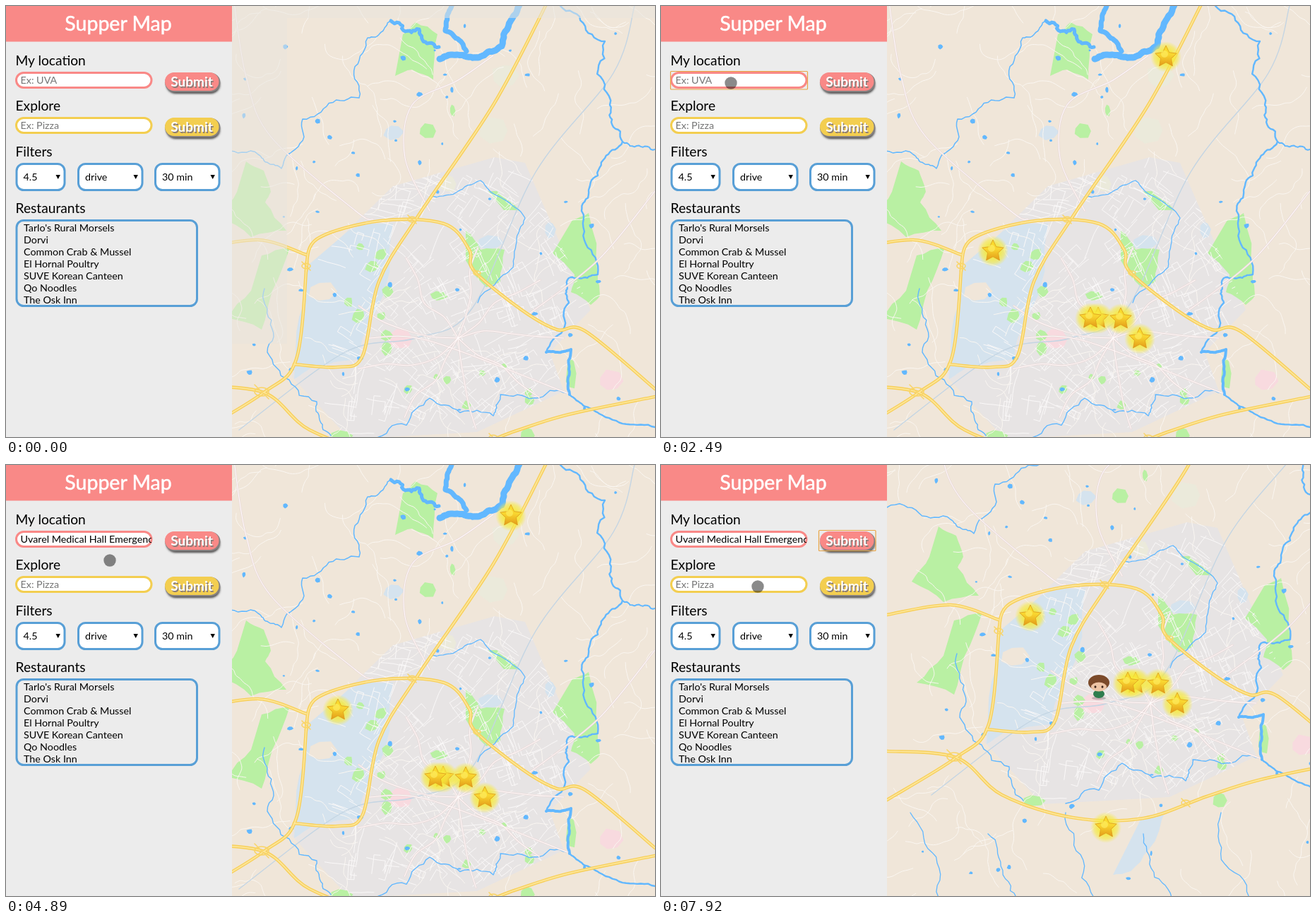
Recreate the animation shown at these times as an HTML page. Size 919 by 610 pixels, loop 8000 ms.

```html
<!DOCTYPE html>
<html lang="en">
<head>
<meta charset="utf-8">
<title>Supper Map</title>
<style>
  html, body { margin: 0; width: 100%; height: 100%; overflow: hidden; background: #ececec; }
  svg { display: block; width: 100vw; height: 100vh; }
  text { font: 14.3px Lato, "Open Sans", sans-serif; white-space: pre; }
  .label { font-size: 19.2px; }
  .title { font-size: 28.5px; fill: #fff; stroke: #fff; stroke-width: .5; text-anchor: middle; }
  .submit { font-size: 19px; font-weight: 700; fill: #fff; text-anchor: middle; }
  .hint { fill: #757575; }
  .option { font: 11.7px "Liberation Sans", Arial, sans-serif; }
  .bold { font-weight: 700; }
  .minor { font-size: 9.7px; fill: #999; }
</style>
</head>
<body>
<svg id="stage" viewBox="0 0 919 610">
  <defs>
    <radialGradient id="glow">
      <stop offset=".45" stop-color="#f6ea35" stop-opacity=".85"/>
      <stop offset=".75" stop-color="#f6ea45" stop-opacity=".6"/>
      <stop offset="1" stop-color="#f6ea55" stop-opacity="0"/>
    </radialGradient>
    <linearGradient id="gold" x2="0" y2="1">
      <stop offset="0" stop-color="#f9df2c"/>
      <stop offset=".45" stop-color="#f8d530"/>
      <stop offset="1" stop-color="#e39a17"/>
    </linearGradient>
    <filter id="blur" x="-20%" y="-50%" width="140%" height="200%"><feGaussianBlur stdDeviation="1.6"/></filter>
    <clipPath id="cityClip"></clipPath>
    <clipPath id="fieldClip"><path d="M15 94H206V117H15z"/></clipPath>
    <clipPath id="listClip"><path d="M15 304H270V423.5H15z"/></clipPath>
    <g id="star">
      <circle r="22" fill="url(#glow)"/>
      <path id="starShape" fill="url(#gold)" stroke="#dd9a1c" stroke-width=".8" stroke-linejoin="round"/>
      <circle cx="-2" cy="-4" r="5" fill="#fff36b" opacity=".55"/>
    </g>
  </defs>
  <g id="map"></g>
  <path id="tiles" fill="#eae5de" d="M320 0H919V17H398V478H320z"/>
  <g id="panel"></g>
</svg>
<script>
const $ = id => document.getElementById(id);
const map = $('map'), panel = $('panel');

function el(tag, attrs, parent, content = '') {
  const node = document.createElementNS('http://www.w3.org/2000/svg', tag);
  for (const key in attrs) node.setAttribute(key, attrs[key]);
  node.textContent = content;
  return parent.appendChild(node);
}
let seed = 7;
function random() {
  seed = seed + 0x6D2B79F5 | 0;
  let r = Math.imul(seed ^ seed >>> 15, 1 | seed);
  r = r + Math.imul(r ^ r >>> 7, 61 | r) ^ r;
  return ((r ^ r >>> 14) >>> 0) / 4294967296;
}
const between = (a, b) => a + (b - a) * random();
const times = (count, make) => Array.from({ length: count }, (_, i) => make(i));
const points = text => text.split(' ').map(p => p.split(',').map(Number));
const polyline = list => 'M' + list.map(p => p.map(v => v.toFixed(1))).join('L');

// Curve through every point (Catmull-Rom).
function spline(list) {
  const at = i => list[Math.min(list.length - 1, Math.max(0, i))];
  const handle = (i, side) => at(i).map((v, k) => (v + side * (at(i + 1)[k] - at(i - 1)[k]) / 6).toFixed(1));
  return 'M' + list[0] + list.slice(1).map((p, i) => `C${handle(i, 1)} ${handle(i + 1, -1)} ${p}`).join('');
}
// Fractal line: shifts segment midpoints sideways.
function rough(list, amount, depth = 4) {
  if (!depth) return list;
  const result = [list[0]];
  for (let i = 1; i < list.length; i++) {
    const [ax, ay] = list[i - 1], [bx, by] = list[i], k = between(-amount, amount);
    result.push([(ax + bx) / 2 - (by - ay) * k, (ay + by) / 2 + (bx - ax) * k], [bx, by]);
  }
  return rough(result, amount, depth - 1);
}
function stroke(d, color, width, extra = {}) {
  el('path', { d, fill: 'none', stroke: color, 'stroke-width': width, 'stroke-linejoin': 'round', 'stroke-linecap': 'round', ...extra }, map);
}
const fill = (color, d, parent = map) => el('path', { d, fill: color }, parent);
const area = (color, text) => fill(color, polyline(rough(points(text), .08, 2)) + 'z');
const river = (width, text, amount = .17) => stroke(polyline(rough(points(text), amount)), '#62b8ff', width);
// Irregular closed outline around a centre.
const blob = (x, y, rx, ry = rx) => polyline(times(7, i => {
  const a = i * Math.PI * 2 / 7, k = between(.75, 1.15);
  return [x + rx * k * Math.cos(a), y + ry * k * Math.sin(a)];
})) + 'z';
function walk(x, y, angle, count, step, turn) {
  const list = [[x, y]];
  for (let i = 0; i < count; i++) {
    angle += turn();
    list.push([x += Math.cos(angle) * step, y += Math.sin(angle) * step]);
  }
  return list;
}
function roads(routes, edge, core, width) {
  const paths = routes.map(route => spline(typeof route === 'string' ? points(route) : route));
  paths.forEach(d => stroke(d, edge, width));
  paths.forEach(d => stroke(d, core, width * .4));
}

// Land
const GREEN = '#b9f0a3', CAMPUS = '#d5e3ee', BEIGE = '#f0e6d9';
el('rect', { x: 200, y: -100, width: 800, height: 900, fill: BEIGE }, map);
const city = polyline(points('548,255 692,214 735,222 782,330 828,430 770,490 790,545 667,603 487,613 405,525 430,370')) + 'z';
fill('#e7e4e4', city);
fill('', city, $('cityClip'));
area(CAMPUS, '485,318 548,308 520,440 500,500 432,512 408,528 415,440 430,365');
area(CAMPUS, '627,633 662,621 637,678 612,708 587,713');
fill(CAMPUS, blob(548, 178, 14, 11) + blob(686, 335, 20, 12) + blob(770, 316, 8, 13));
fill(BEIGE, blob(447, 404, 20, 16));
fill('#ebeadb', blob(707, 98, 18) + blob(690, 176, 20, 17) + blob(625, 252, 13));
fill('#f8dadf', blob(557, 471, 18, 14) + blob(855, 531, 20, 15));
area(GREEN, '562,40 580,23 611,40 605,104 575,90 551,99');
area(GREEN, '802,303 825,293 838,381 841,410 828,423 800,405 805,380 774,350');
area(GREEN, '651,318 672,345 706,345 700,390 680,398 651,360');
area(GREEN, '340,220 365,233 375,263 367,278 397,318 347,327 302,298 327,263');
area(GREEN, '362,353 402,341 377,403 362,458 309,441 347,403');
area(GREEN, '683,262 695,262 728,290 705,289');
fill(GREEN, blob(596, 177, 13, 11) + blob(612, 411, 12, 7) + blob(800, 520, 7, 24) + blob(475, 608, 16, 8) + blob(738, 608, 10, 12) + blob(632, 148, 4, 9));
fill(GREEN, times(9, () => blob(between(480, 545), between(325, 490), between(5, 11))).join(''));
fill(GREEN, times(8, () => blob(between(560, 780), between(480, 570), between(3, 8))).join(''));

// Local streets: right-angled in the city, meandering outside
stroke(times(140, () => spline(walk(between(260, 920), between(-10, 740), between(0, 6.3), between(5, 17), 8, () => between(-.55, .55)))).join(''),
  '#fbf7f2', 1);
stroke(times(330, () => {
  const x = between(480, 830), y = between(215, 610);
  const heading = .5 + .4 * Math.sin(x / 90) + .4 * Math.cos(y / 70) + Math.floor(between(0, 4)) * Math.PI / 2;
  return polyline(walk(x, y, heading, between(2, 6), 9, () => random() < .2 ? Math.PI / 2 : between(-.12, .12)));
}).join(''), '#faf8f8', 1, { 'clip-path': 'url(#cityClip)' });
stroke(spline(points('890,0 860,95 750,235 660,428 580,470 480,490 330,600')), '#c4d5e3', 1.4);

// Water
river(5, '545,21 585,33 613,58', .3);
river(9, '614,75 640,69 668,73 702,57 728,-5', .1);
river(7, '634,-5 622,35 652,64', .1);
river(1.5, '545,21 512,45 500,130 420,160 390,230 357,210 267,193');
river(2.4, '785,0 848,50 855,140 873,192 838,240 815,290 838,380 797,385 797,420 765,490');
river(4, '765,490 800,486 798,550', .1);
river(2.4, '798,550 840,577 919,596', .08);
river(2, '919,203 873,192');
river(1.3, '600,270 672,247 735,300 718,370 668,420', .1);
river(1.4, '520,612 600,555 690,580 700,550 795,548');
river(1.4, '366,400 370,490 440,560 460,608');
times(5, i => river(1.3, `${300 + i * 110},${625 + i % 2 * 30} ${340 + i * 110},745`));
fill('#62b8ff', times(60, () => blob(between(270, 915), between(10, 735), between(1.5, 5), between(1.5, 4))).join(''));

// Main roads
const spokes = times(9, i => rough([[640, 470], [640 + 150 * Math.cos(i * .7), 470 + 130 * Math.sin(i * .7)]], .12, 2));
roads([
  '323,-5 340,100 375,185 495,290 520,302', '690,70 640,105 575,140 565,215 600,290',
  '919,262 838,360 740,436', '512,470 600,474 795,548', ...spokes
], '#e9d9d8', '#fffafa', 2.6);
roads([
  '768,-8 690,140 583,298 528,390 505,495 470,511 408,507',
  '425,375 440,330 530,304 620,308 656,345 663,375 730,430 780,458 820,460 919,542',
  '267,345 357,331 425,352', '426,362 411,500 365,547 267,607',
  '267,538 365,547 430,600 530,632 630,633 720,602 797,578 919,553'
], '#f7cf5b', '#fde698', 4.6);
const RING = '#f9d569';
for (const [x, y, r] of points('362,546,10 575,302,6 425,368,6 667,378,5 690,611,6')) {
  el('ellipse', { cx: x, cy: y, rx: r, ry: r * .6, fill: 'none', stroke: RING, 'stroke-width': 1.6 }, map);
  stroke(`M${x - r} ${y - r}l${2 * r} ${2 * r}`, RING, 1.6);
}
const bottomTile = el('rect', { x: 200, y: 710, width: 800, height: 90, fill: '#e5e3df' }, map);

// Markers
$('starShape').setAttribute('d', polyline(times(10, i => {
  const r = i % 2 ? 7.8 : 16, a = i * Math.PI / 5 - Math.PI / 2;
  return [r * Math.cos(a), r * Math.sin(a)];
})) + 'z');
const stars = el('g', {}, map);
for (const [x, y] of points('470,347 715,72 619,442 608,442 651,443 678,471 577,646'))
  el('use', { href: '#star', x, y }, stars);
const person = el('g', {}, map);
const oval = (cx, cy, rx, ry, color) => el('ellipse', { cx, cy, rx, ry, fill: color }, person);
oval(567, 463, 10, 2.5, '#0003');
oval(567, 457, 8, 6, '#2f7d4f');
oval(567, 433, 13, 7, '#f2eeee');
oval(567, 441, 15, 11, '#7b4a2a');
oval(567, 447, 11, 6.5, '#eec5a5');
[-5, 5].forEach(dx => oval(567 + dx, 447, 1.5, 1.8, '#3b241a'));

// Side panel
const box = (x, y, width, height, rx, attrs, parent = panel) => el('rect', { x, y, width, height, rx, ...attrs }, parent);
const text = (x, y, content, cls = '', parent = panel) => el('text', { x, y, class: cls }, parent, content);
const PINK = '#f98987', YELLOW = '#f3ce50', BLUE = '#589fd6';
box(0, 0, 320, 610, 0, { fill: '#ececec' });
box(0, 0, 320, 50.5, 0, { fill: PINK });
text(159, 34.5, 'Supper Map', 'title');
[['My location', 84], ['Explore', 148], ['Filters', 213], ['Restaurants', 293]].forEach(([name, y]) => text(13.5, y, name, 'label'));
function searchRow(y, color) {
  box(14.5, y + 1.5, 191.5, 21, 10.5, { fill: '#fff', stroke: color, 'stroke-width': 3 });
  box(227, y + 6, 76, 25, 13, { fill: '#444', filter: 'url(#blur)' });
  box(225, y + 1.5, 78.5, 27.5, 14, { fill: '#858080' });
  box(225, y + 1, 76.5, 26, 13, { fill: color });
  text(264.5, y + 22.5, 'Submit', 'submit').style.fill = '#8a7c78';
  text(263, y + 21, 'Submit', 'submit');
}
searchRow(93, PINK);
searchRow(157, YELLOW);
text(20.5, 174, 'Ex: Pizza', 'hint');
[[15, 68, '4.5'], [102.5, 90.5, 'drive'], [211.5, 90.5, '30 min']].forEach(([x, width, value]) => {
  box(x, 223.5, width, 37, 10, { fill: '#fff', stroke: BLUE, 'stroke-width': 3 });
  text(x + 9.5, 247, value);
  el('path', { d: `M${x + width - 12.5} 239h6.4l-3.2 6z` }, panel);
});
box(15, 303.5, 255.5, 121, 10, { fill: 'none', stroke: BLUE, 'stroke-width': 3 });
const list = el('g', { 'clip-path': 'url(#listClip)' }, panel);
["Tarlo's Rural Morsels", 'Dorvi', 'Common Crab & Mussel', 'El Hornal Poultry', 'SUVE Korean Canteen', 'Qo Noodles', 'The Osk Inn']
  .forEach((name, i) => text(25, 318.5 + 17.1 * i, name, '', list));

const field = text(20.5, 110, '', '', el('g', { 'clip-path': 'url(#fieldClip)' }, panel));
const caret = box(0, 97, 1, 16, 0, {});
const outline = { fill: 'none', stroke: '#e9a545', 'stroke-width': 1.2 };
const fieldFocus = box(13.5, 92.5, 194, 25.5, 1, outline);
const buttonFocus = box(223.5, 92.5, 80.5, 29, 1, outline);

// Suggestions
const menu = el('g', {}, panel);
box(13, 120, 189, 156, 1, { fill: '#0006', filter: 'url(#blur)' }, menu);
box(13, 118.5, 189, 155.5, 1, { fill: '#fff' }, menu);
[['Uva', 'rel Medical Hall Emerge…'], ['Uva', 'lto Readers', 'Tamble Street …', 120], ['University of Virginia', '', 'Charlo…', 157],
 ['Uva', 'mer Care System Gene…'], ['Uva', 'ndo Clinic Annex West …']].forEach(([match, rest, place, x], i) => {
  const y = 136 + 28 * i;
  const line = text(37, y, '', 'option', menu);
  el('tspan', { class: 'bold' }, line, match);
  el('tspan', {}, line, rest);
  if (place) text(x, y, place, 'option minor', menu);
  el('path', { d: `M24 ${y + 2}l-3 -6a4 4 0 1 1 6 0z`, fill: '#b3b3b3' }, menu);
  el('circle', { cx: 24, cy: y - 6.5, r: 1.3, fill: '#fff' }, menu);
  if (i < 4) box(13, y + 10, 189, 1, 0, { fill: '#e6e6e6' }, menu);
});
text(93, 269, 'powered by', 'option', menu).style.fill = '#666';
el('circle', { cx: 166, cy: 265, r: 6, fill: '#4285f4' }, menu);

const cursor = el('circle', { r: 8.7 }, panel);

// Motion
const CURSOR_PATH = [[1200, 68, 24], [1550, 97, 121], [1800, 99, 109], [3830, 99, 109], [4150, 269, 98], [4510, 147, 135],
  [5070, 147, 135], [5530, 266, 108], [7470, 266, 108], [7920, 137, 172]];
const clamp = v => Math.min(1, Math.max(0, v));
const within = (t, a, b) => t >= a && t < b;
const show = (node, visible) => node.style.display = visible ? '' : 'none';
const shift = (node, x, y) => node.setAttribute('transform', `translate(${x} ${y})`);

function cursorAt(t) {
  const next = CURSOR_PATH.findIndex(k => k[0] > t);
  if (next < 1) return CURSOR_PATH.at(next).slice(1);
  const [ta, xa, ya] = CURSOR_PATH[next - 1], [tb, xb, yb] = CURSOR_PATH[next];
  const p = (t - ta) / (tb - ta), e = p * p * (3 - 2 * p);
  return [xa + (xb - xa) * e, ya + (yb - ya) * e];
}
// Fall, rebound by 20 px, settle.
function drop(node, t, start) {
  const p = clamp((t - start) / 500);
  show(node, p > 0);
  const y = p < .5 ? -500 * (1 - (2 * p) ** 2)
    : p < .75 ? -20 * (1 - (3 - 4 * p) ** 2)
    : -20 * (1 - (4 * p - 3) ** 2);
  shift(node, 0, y);
}
function render(t) {
  const panned = t >= 6770;
  shift(map, panned ? 53 : 0, panned ? -133 : 0);
  drop(stars, t, 10);
  drop(person, t, 6640);
  $('tiles').style.opacity = .55 * (1 - clamp((t - 60) / 200));
  bottomTile.style.opacity = 1 - clamp((t - 6820) / 200);

  const typed = [2950, 3120, 3270].filter(time => t >= time).length;
  field.textContent = t >= 4890 ? 'Uvarel Medical Hall Emergency' : 'uva'.slice(0, typed) || 'Ex: UVA';
  field.setAttribute('class', typed ? '' : 'hint');
  caret.setAttribute('x', 21 + 7.7 * typed);
  show(caret, within(t, 2030, 2490) || within(t, 2950, 3750) || within(t, 4250, 4740));
  show(fieldFocus, within(t, 2030, 4890));
  show(buttonFocus, t >= 5990);
  show(menu, within(t, 3440, 4890));

  const pressed = within(t, 2030, 2120) || within(t, 4740, 4890) || within(t, 5990, 6070);
  shift(cursor, ...cursorAt(t));
  show(cursor, t >= 1250);
  cursor.setAttribute('fill-opacity', pressed ? .6 : .46);
}
function frame() {
  render(performance.now() % 8000);
  requestAnimationFrame(frame);
}
frame();
</script>
</body>
</html>
```
